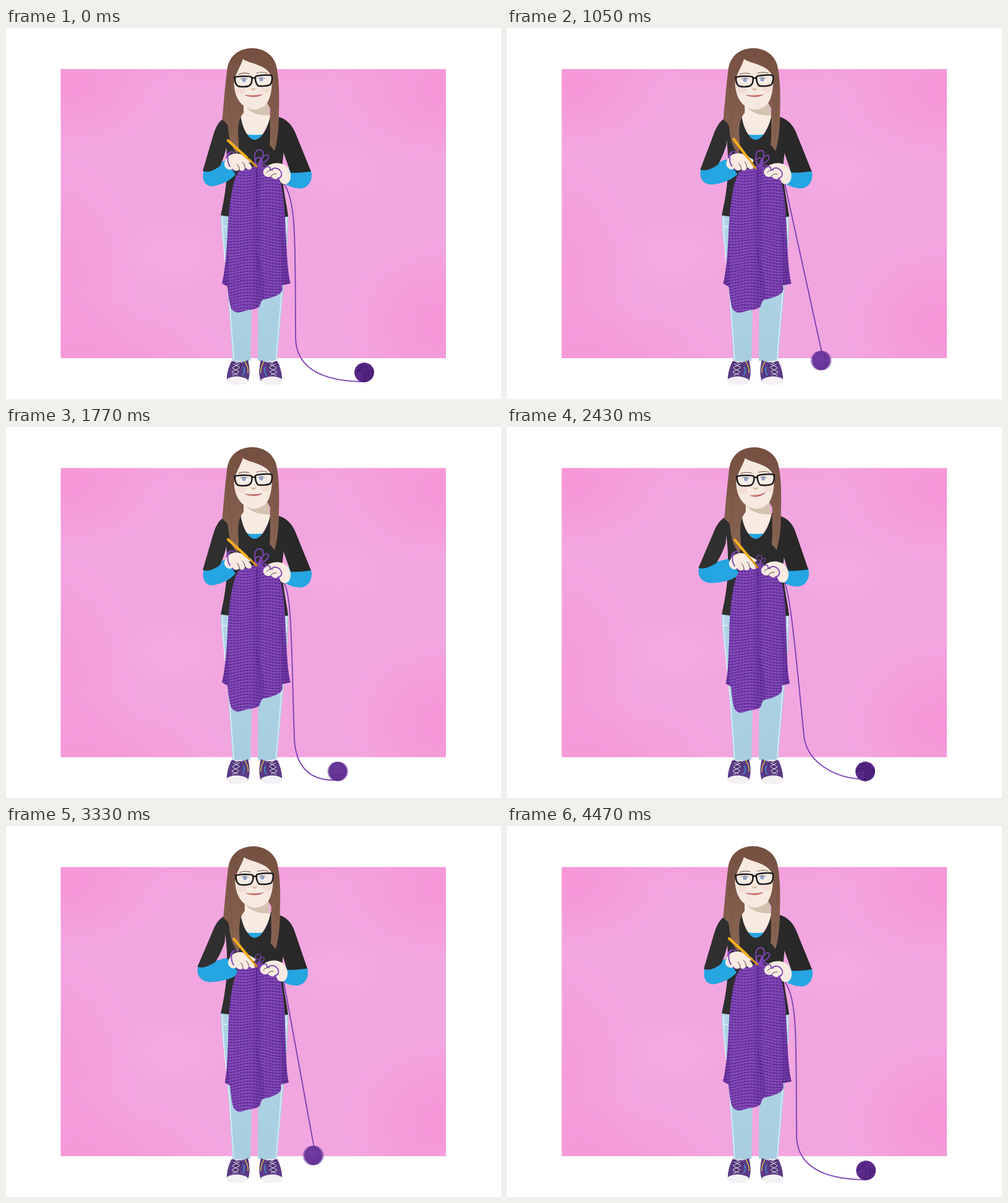
An HTML page for the animation above (4.5 s loop, 800x600 px).

```html
<!DOCTYPE html>
<html lang="en">
<head>
<meta charset="utf-8">
<title>Knitting</title>
<style>
html, body { margin: 0; width: 100%; height: 100%; overflow: hidden; background: #fff; }
svg { display: block; width: 100vw; height: 100vh; }
.yarn { fill: none; stroke: #7f45b6; stroke-width: 1.9; stroke-linecap: round; stroke-linejoin: round; }
.skin { fill: #f8ebe2; }
.shirt { fill: url(#black); }
.under { fill: #25a5e2; }
.crease { fill: none; stroke: #4a3636; stroke-width: 1; stroke-linecap: round; }
</style>
</head>
<body>
<svg viewBox="0 0 800 600" preserveAspectRatio="none">
  <defs>
    <radialGradient id="deep"><stop offset="0" stop-color="#f890d4" stop-opacity=".75"/><stop offset=".5" stop-color="#f890d4" stop-opacity=".42"/><stop offset="1" stop-color="#f890d4" stop-opacity="0"/></radialGradient>
    <radialGradient id="pale"><stop offset="0" stop-color="#f6b4e6" stop-opacity=".5"/><stop offset="1" stop-color="#f6b4e6" stop-opacity="0"/></radialGradient>
    <linearGradient id="hair" x1="0" y1="0" x2="0" y2="1"><stop offset="0" stop-color="#755041"/><stop offset="1" stop-color="#8a6553"/></linearGradient>
    <linearGradient id="denim" x1="0" y1="0" x2="0" y2="1"><stop offset="0" stop-color="#b1d5e6"/><stop offset="1" stop-color="#a7cee0"/></linearGradient>
    <linearGradient id="black" gradientUnits="userSpaceOnUse" x1="310" x2="490" y1="0" y2="0"><stop offset="0" stop-color="#313131"/><stop offset="1" stop-color="#272727"/></linearGradient>
    <linearGradient id="folds" x1="0" x2="1">
      <stop offset="0" stop-color="#3f1670" stop-opacity=".25"/><stop offset=".14" stop-color="#3f1670" stop-opacity="0"/>
      <stop offset=".42" stop-color="#3f1670" stop-opacity="0"/><stop offset=".52" stop-color="#3f1670" stop-opacity=".22"/>
      <stop offset=".6" stop-color="#3f1670" stop-opacity="0"/><stop offset=".82" stop-color="#3f1670" stop-opacity=".05"/>
      <stop offset="1" stop-color="#3f1670" stop-opacity=".3"/>
    </linearGradient>
    <radialGradient id="wool" cx=".45" cy=".42" r=".62"><stop offset="0" stop-color="#7a45ac"/><stop offset="1" stop-color="#6a369b"/></radialGradient>
    <clipPath id="frame"><rect x="88.500" y="66.500" width="622.500" height="467.500"/></clipPath>
    <clipPath id="clothClip"><path id="clothShape"/></clipPath>
    <clipPath id="ballClip"><circle r="15.8"/></clipPath>
    <filter id="blur" x="-40%" y="-40%" width="180%" height="180%"><feGaussianBlur id="blurAmt" stdDeviation="0"/></filter>
  </defs>

  <rect width="800" height="600" fill="#fff"/>
  <g clip-path="url(#frame)">
    <rect x="88" y="66" width="624" height="469" fill="#f2a6e0"/>
    <ellipse cx="95" cy="90" rx="170" ry="110" fill="url(#deep)"/>
    <ellipse cx="85" cy="400" rx="130" ry="200" fill="url(#deep)" opacity=".7"/>
    <ellipse cx="150" cy="535" rx="210" ry="100" fill="url(#deep)" opacity=".75"/>
    <ellipse cx="715" cy="100" rx="190" ry="120" fill="url(#deep)"/>
    <ellipse cx="705" cy="480" rx="160" ry="140" fill="url(#deep)"/>
    <ellipse cx="400" cy="60" rx="280" ry="45" fill="url(#deep)" opacity=".5"/>
    <ellipse cx="535" cy="235" rx="75" ry="50" fill="url(#pale)"/>
    <ellipse cx="270" cy="365" rx="85" ry="55" fill="url(#pale)"/>
  </g>

  <!-- legs -->
  <path d="M347 300 L456 300 C456 350 450 410 446 450 L438 537 Q422 541 407 538 L407.500 452 L397 452 L395 538 Q380 541 366 538 C364 500 359 430 355 385 C351 350 347 330 347 300Z" fill="url(#denim)"/>
  <path d="M350 306 C349 345 357 400 361 440 L368 537 M453 306 C453 350 447 410 444 445 L436.500 537 M349 320 L357 321.5 M455 320 L447 321.5" fill="none" stroke="#e6f4fa" stroke-width="1.3"/>

  <!-- shoes -->
  <g id="shoe">
    <path d="M365 538 C374 542 384 541 391 537 C394 548 395 562 391 571 C382 578 364 578 357 572 C356 560 360 547 365 538Z" fill="#5b3a86"/>
    <path d="M357 568 C364 562 380 562 390 568 C392 571 390 575 384 576.500 C374 578 362 578 357 574Z" fill="#f3f1f4"/>
    <path d="M366 539 C372 542 378 542 382 540 L376 562 L367 561Z" fill="#4c2f72"/>
    <path d="M386 539 C389 546 392 549 391 558" fill="none" stroke="#e9da35" stroke-width="1.2"/>
    <path d="M384 548 C386 553 385 559 382 562" fill="none" stroke="#2fb4e4" stroke-width="1.2"/>
    <path d="M362 541 Q368 534 373 543 Q379 533 381 542 M367 543 L378 549 M378 543 L366 549 M366 550 L377 556 M377 550 L365 556 M365 557 L375 561 M376 557 L366 562" fill="none" stroke="#d5cedf" stroke-width="1.100"/>
  </g>
  <use href="#shoe" transform="translate(803,0) scale(-1,1)"/>

  <!-- body -->
  <path class="skin" d="M380 125 L422 115 C423 135 426 142 429 146 L412 176 L390 176 L378 146 C380 140 380 132 380 125Z"/>
  <path d="M387 124 L424 118 L426 141 C411 142 397 139 387 127Z" fill="#d3c3b0"/>
  <path class="under" d="M388 172 Q402 174 416 172 L403 184Z"/>
  <path class="shirt" d="M379 140 C370 144 358 144 350 148 C354 170 358 195 357 225 C357 255 352 280 347 303 Q400 312 456 305 C453 280 446 255 446 225 L450 190 L448 147 C440 143 433 142 428 139 C424 160 414 180 402 181 C391 180 381 160 379 140Z"/>
  <path id="foreL" class="under"/>
  <path id="foreR" class="under"/>
  <path id="sleeveL" class="shirt"/>
  <path id="sleeveR" class="shirt"/>

  <!-- head -->
  <g id="head">
    <path d="M398 32.500 C376 33 361 45 357.500 66 C354 95 352 120 349.500 147 C351 151 357 153 358.500 158 C360 178 364 194 374 204 C379 190 373 170 376 156 C377 148 380 142 384 137 L384 116 L420 118 L427 130 C426 155 428 172 426 190 C430 192 431 196 434 199 C438 185 441 165 441 140 C442 115 442 80 436 58 C430 42 416 33 398 32.500Z" fill="url(#hair)"/>
    <path d="M363 70 C358 105 362 140 365 175 M436 80 C436 115 435 145 433 180" fill="none" stroke="#6b4736" stroke-width="1" opacity=".4"/>
    <path d="M383 50 C392 58 421 58 429 78 C431 96 428 114 420 124 C411 132 401 133 394 131 C379 126 371 113 369 96 C367 78 378 66 383 50Z" fill="#f6e9df"/>
    <ellipse cx="379" cy="101" rx="8" ry="6" fill="#f2d2c8" opacity=".5"/>
    <ellipse cx="420" cy="99" rx="8" ry="6" fill="#f2d2c8" opacity=".5"/>
    <path d="M376 75 Q383 71.500 393 74 M405 73 Q414 70 422 73" fill="none" stroke="#7c5a49" stroke-width="1.200" stroke-linecap="round"/>
    <g fill="#fff"><ellipse cx="384.500" cy="84.500" rx="6.500" ry="3.500"/><ellipse cx="412.500" cy="83.500" rx="6.500" ry="3.500"/></g>
    <g fill="#8393bd"><circle cx="384.500" cy="84" r="3.500"/><circle cx="412.500" cy="83" r="3.500"/></g>
    <path d="M378 83 Q384 79.500 391 83 M406 82 Q413 78.500 419 82" fill="none" stroke="#68534f" stroke-width=".8"/>
    <path d="M394 97 Q399 99 405 97 Q402 102 398.500 101Z" fill="#d9b9a4"/>
    <g fill="#ffffff28" stroke="#1c1b1e" stroke-width="2.500" stroke-linejoin="round">
      <path d="M370 80 C372 78 394 77 397 79.500 C398.500 84 397 91 393 93.500 C388 95.500 379 95.500 375 94 C371 92 369.500 85 370 80Z"/>
      <path d="M403 79 C405 76.500 426 75 429.500 77 C431 82 429.500 89 426.500 92 C422 94 412 94.500 407.500 93.500 C404 91 402.500 84 403 79Z"/>
      <path d="M397 82 Q400 80 403 81.500 M370 80 L368 79 M429 78 L431 77" fill="none"/>
    </g>
    <path id="mouth" fill="#cf6a6a" stroke="#a8504f" stroke-width=".5"/>
  </g>

  <!-- knitting -->
  <g clip-path="url(#clothClip)">
    <rect x="340" y="215" width="130" height="255" fill="#7d42b1"/>
    <path id="rowsLight" fill="none" stroke="#8b51c0" stroke-width="1"/>
    <path id="rows" fill="none" stroke="#54278e" stroke-width="1.400" stroke-dasharray="3.600 1.600"/>
    <rect x="349" y="215" width="111" height="255" fill="url(#folds)"/>
    <path d="M349 413 Q357 390 359 340 L360 420Z M446 417 Q447 370 440 300 Q453 350 456 415Z M411 445 Q410 400 402 350 Q420 400 418 440Z" fill="#451a78" opacity=".2"/>
    <path d="M406 222 C404 245 407 260 405 290" fill="none" stroke="#451a7c" stroke-width="2.500" stroke-dasharray="3 2" opacity=".55"/>
  </g>

  <path id="thread" class="yarn"/>
  <g id="loops" class="yarn">
    <path d="M-1 2 C-10 -13 -6 -25 2 -25 C11 -25 8 -10 0 0 M0 0 C2 -12 14 -21 16 -15 C18 -8 6 -2 -2 0 M-5 -2 C-8 -12 2 -16 5 -9 C8 -3 2 2 -2 3 M2 4 C8 -4 16 0 13 6"/>
  </g>
  <g id="handR">
    <path class="skin" d="M416 231 C420 222 432 217 443 219 C455 221 461 232 460 241 C459 250 454 254 448 252 C443 251 443 246 441 243 C436 246 430 243 428 240 C422 243 414 238 416 231Z"/>
    <path class="crease" d="M421 234 Q425 229 431 230 M428 240 Q431 235 437 236"/>
    <path class="yarn" d="M414 231 C420 222 428 222 427 230 M429 229 C437 222 448 232 445 239 Q443 243 439 243"/>
  </g>
  <g id="handL">
    <path class="yarn" d="M371 231 C358 227 353 210 360 202 C366 197 370 203 373 207"/>
    <path class="skin" d="M353 218 C356 208 364 202 374 203 C382 204 390 210 396 213 C399 216 396 219 391 217 C395 220 399 225 396 228 C392 231 388 227 386 225 C387 230 381 233 377 229 C373 233 367 230 366 227 C362 233 351 226 353 218Z"/>
    <path class="crease" d="M377 229 Q377 223 373 220 M386 225 Q386 220 382 217"/>
    <path class="yarn" d="M362 224 C357 216 357 207 362 202"/>
  </g>
  <g id="hook">
    <path d="M0 0 L-24 0" stroke="#e59a1c" stroke-width="3" stroke-linecap="round"/>
    <path id="handle" stroke="#f4ae1e" stroke-width="4.200" stroke-linecap="round"/>
    <path d="M0 0 l-3 2" stroke="#c47f12" stroke-width="2" stroke-linecap="round"/>
  </g>

  <g id="ball">
    <g filter="url(#blur)">
      <circle r="15.800" fill="url(#wool)"/>
      <g id="strands" clip-path="url(#ballClip)" fill="none" stroke-width="1.700"></g>
    </g>
  </g>
</svg>

<script>
const LOOP = 4500, SWING = 2250, STITCH = 900;
const $ = id => document.getElementById(id);
const set = (id, name, v) => $(id).setAttribute(name, v);
const lerp = (a, b, k) => a + (b - a) * k;
const clamp = k => Math.max(0, Math.min(1, k));
const ease = k => (k = clamp(k), k * k * (3 - 2 * k));

// Monotone cubic through rows of [time, value, value, ...]
function keys(rows, t) {
  let i = 0;
  while (i < rows.length - 2 && t >= rows[i + 1][0]) i++;
  const h = rows[i + 1][0] - rows[i][0], u = (t - rows[i][0]) / h;
  return rows[i].slice(1).map((v, n) => {
    const rate = j => rows[j] && rows[j + 1] ? (rows[j + 1][n + 1] - rows[j][n + 1]) / (rows[j + 1][0] - rows[j][0]) : 0;
    const slope = j => {
      const p = rate(j - 1), q = rate(j);
      return p * q > 0 ? 2 * p * q / (p + q) : 0;
    };
    const w = rows[i + 1][n + 1], u2 = u * u, u3 = u2 * u;
    return v * (2 * u3 - 3 * u2 + 1) + w * (3 * u2 - 2 * u3) +
      h * (slope(i) * (u3 - 2 * u2 + u) + slope(i + 1) * (u3 - u2));
  });
}

// Move every point of a path
const warp = (d, f) => d.replace(/(-?[\d.]+) (-?[\d.]+)/g,
  (_, x, y) => f(+x, +y).map(v => v.toFixed(2)).join(' '));

// time, elbow, sway, hook angle, hook tip x y, hand dx dy
const POSE = [
  [0, 0, 0, 42.4, 405, 224, 0, 0],
  [150, .46, .1, 53, 402, 227, 1.5, -.5],
  [390, 1, 1, 60, 401, 226, 8, 1],
  [540, 1.06, 1, 58, 403, 227, 7.5, 1],
  [630, .7, 1, 50.4, 405, 227, 6, 1],
  [720, .5, .6, 46, 405, 226, 3, .5],
  [870, 0, 0, 42.4, 405, 224, 0, 0],
  [900, 0, 0, 42.4, 405, 224, 0, 0]
];

const BALL_X = [[0, 579], [560, 579], [760, 568], [900, 546], [990, 527], [1050, 508], [1080, 497],
  [1200, 462], [1340, 448], [1480, 464], [1620, 500], [1740, 530], [1770, 536], [1900, 564],
  [2080, 588], [2160, 585], [2250, 579]];
const BALL_Y = [[0, 557], [900, 557], [990, 550], [1050, 538], [1080, 533], [1200, 520],
  [1340, 515], [1480, 530], [1600, 557], [2250, 557]];

// Yarn: two control points, knee, two control points, then end relative to the ball
const REST = [470, 280, 467, 350, 468, 500, 468, 555, 520, 572, 1, 15];
const PULL = [459, 278, 468, 380, 480, 500, 485, 545, 535, 568, -9, 12];
const ROLL = [462, 270, 461, 360, 466, 505, 468, 542, 484, 572, -5, 14];

const FORE_L = 'M319 234 C316 250 326 259 339 255 C351 252 362 247 371 237 L355 214 C346 218 336 224 319 230Z';
const SLEEVE_L = 'M357 144 C347 147 340 156 335 173 L318 231 C326 235 337 230 346 223 C351 212 354 203 357 190Z';
const FORE_R = 'M493 231 C496 242 492 255 480 259 C470 261 460 257 450 252 L458 226Z';
const SLEEVE_R = 'M442 144 C453 148 461 155 467 168 L493 232 C483 233 471 235 460 234 C456 221 450 208 446 192Z';
const CLOTH = 'M376 232 C367 245 362 275 359 315 C357 355 355 390 349 413 L358 418 C359 430 361 444 363 451 C366 459 373 462 381 459 C391 455 403 456 409 451 C412 446 411 441 416 439 C427 437 440 433 445 427 C447 424 447 420 446 416 L460 413 C454 395 453 340 451 310 C450 280 446 252 440 240 C427 230 418 224 407 222 C394 225 386 228 376 232Z';

function drawYarn(t, ball) {
  const start = [449, 252], top = [1, -14];
  const knots = [];
  for (const f of [.27, .53, .8, .87, .94])
    knots.push(lerp(start[0], ball[0] + top[0], f), lerp(start[1], ball[1] + top[1], f));
  const taut = [...knots, ...top];
  const blend = (a, b, k) => a.map((v, i) => lerp(v, b[i], k));
  let p;
  if (t < 180) p = blend(REST, PULL, t / 180);
  else if (t < 640) p = blend(PULL, taut, ease((t - 180) / 460));
  else if (t < 1450) p = taut;
  else if (t < 1740) p = blend(taut, ROLL, ease((t - 1450) / 290));
  else p = blend(ROLL, REST, ease((t - 1740) / 330));
  p[10] += ball[0];
  p[11] += ball[1];
  set('thread', 'd', `M${start} C${p.slice(0, 6)} C${p.slice(6)}`);
}

function drawBall(t, x, y) {
  const speed = Math.abs(keys(BALL_X, Math.min(t + 15, SWING))[0] - keys(BALL_X, Math.max(t - 15, 0))[0]) / 30;
  set('ball', 'transform', `translate(${x},${y})`);
  set('strands', 'transform', `rotate(${(x - 579) * 180 / Math.PI / 16})`);
  set('strands', 'opacity', 1 - .8 * clamp(speed * 4));
  set('blurAmt', 'stdDeviation', `${Math.min(2.4, speed * 5)} ${Math.min(.7, speed * 1.8)}`);
}

function draw(time) {
  const t = time % SWING;
  const [bend, sway, angle, tipX, tipY, hx, hy] = keys(POSE, time % STITCH);
  const ex = -13 * bend, ey = -8 * bend, rx = -6 * sway, ry = -1.5 * sway;

  set('foreL', 'd', warp(FORE_L, (x, y) => {
    const k = clamp((x - 319) / 50);
    return [x + lerp(ex, hx, k), y + lerp(ey, hy, k)];
  }));
  set('sleeveL', 'd', warp(SLEEVE_L, (x, y) => {
    const k = clamp((y - 146) / 86) ** 1.3;
    return [x + ex * k * .95, y + ey * k * .65];
  }));
  set('foreR', 'd', warp(FORE_R, (x, y) => [x + rx, y + ry]));
  set('sleeveR', 'd', warp(SLEEVE_R, (x, y) => {
    const k = clamp((y - 146) / 86);
    return [x + rx * k, y + ry * k];
  }));

  set('head', 'transform', `translate(${1.8 * sway},${.3 * sway})`);
  const smirk = ease((time - 2050) / 250) * (1 - ease((time - 2650) / 300));
  const left = `${386 + 5 * smirk} ${108.5 + 2 * smirk}`;
  const right = `${414 + 2 * smirk} ${107.5 - 2 * smirk}`;
  set('mouth', 'd', `M${left} C${394 + 3 * smirk} ${109.5 + smirk} 406 ${109.5 + smirk} ${right} C408 ${112 + smirk} ${396 + 3 * smirk} ${112.5 + smirk} ${left}Z`);

  // The hem narrows with the sway, the left edge bulges as the hook turns up
  const bulge = sway * clamp((angle - 50) / 10);
  set('clothShape', 'd', warp(CLOTH, (x, y) => {
    const k = clamp((y - 232) / 181);
    const edge = clamp((405 - x) / 45) * Math.sin(Math.PI * k);
    return [x - .07 * sway * (x - 418) * k ** 2 - 4 * bulge * edge, y + 2 * sway * k];
  }));
  set('loops', 'transform', `translate(${408 - sway},${222 + sway}) scale(${1 - .36 * sway})`);
  set('handL', 'transform', `translate(${hx},${hy})`);
  set('handR', 'transform', `translate(${-5 * sway},${-sway})`);
  set('hook', 'transform', `translate(${tipX},${tipY}) rotate(${angle})`);
  set('handle', 'd', `M-22 0 H${7 * bend - 62.5}`);

  const ball = [keys(BALL_X, t)[0], keys(BALL_Y, t)[0]];
  drawYarn(t, ball);
  drawBall(t, ...ball);
}

function build() {
  const row = y0 => {
    let d = '';
    for (let x = 342; x <= 466; x += 4) {
      const y = y0 + 2.6 * Math.sin(x / 13 + y0 / 70) + 1.8 * Math.sin(x / 29 - y0 / 45);
      d += `${d ? 'L' : 'M'}${x} ${y.toFixed(1)}`;
    }
    return d;
  };
  let dark = '', light = '';
  for (let y = 220; y < 470; y += 4.8) {
    dark += row(y);
    light += row(y + 2.4);
  }
  set('rows', 'd', dark);
  set('rowsLight', 'd', light);

  let strands = '';
  for (let i = -4; i < 5; i++) {
    const o = i * 3.4;
    strands += `<path d="M${o - 16} 16 Q${o - 2} 4 ${o + 12} -16" stroke="#4b1d78"/>`;
    if (i > -1) strands += `<path d="M-2 ${o + 2} Q8 ${o} 17 ${o - 8}" stroke="#3f1769"/>`;
    else strands += `<path d="M-17 ${o + 3} Q-4 ${o - 1} 9 ${o + 5}" stroke="#3f1769"/>`;
  }
  $('strands').innerHTML = strands;
}

build();
const begin = performance.now();
function tick() {
  draw((performance.now() - begin) % LOOP);
  requestAnimationFrame(tick);
}
tick();
</script>
</body>
</html>
```
